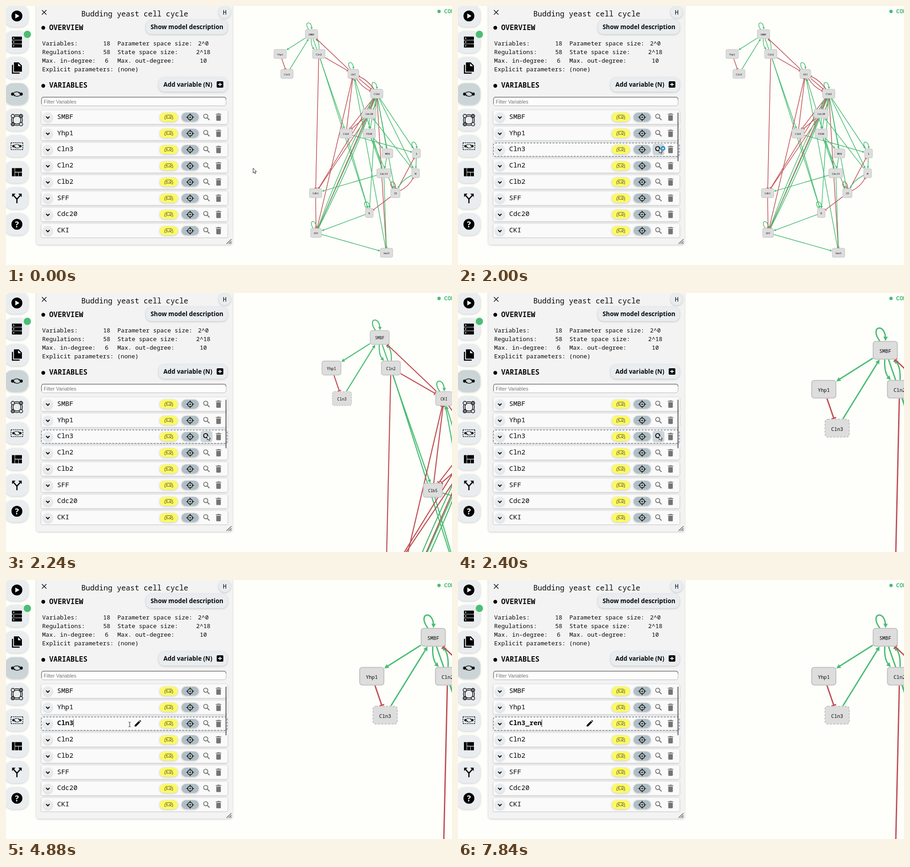
An HTML page for the animation above (8 s loop, 981 px wide and 571 px high).

```html
<!DOCTYPE html>
<html lang="en">
<head>
<meta charset="utf-8">
<title>Model editor</title>
<style>
  html, body { margin: 0; width: 100%; height: 100%; overflow: hidden; background: #fefefb; }
  svg { display: block; width: 981px; height: 571px; }
  text { white-space: pre; fill: #080808; }
  .mono { font-family: "Noto Sans Mono", "DejaVu Sans Mono", monospace; }
  .btn { font: 700 13.4px "Noto Sans", "Open Sans", sans-serif; }
  .mid { text-anchor: middle; }
  .sh { filter: drop-shadow(0 1.5px 2px rgba(0, 0, 0, .22)); }
  .line { fill: none; stroke: #111; stroke-width: 1.5; }
</style>
</head>
<body>
<svg id="stage" viewBox="0 0 981 571" xmlns="http://www.w3.org/2000/svg"></svg>
<script>
const LOOP = 8000;
const GREEN = '#4abd73', RED = '#bf5055';
const ROWS = ['SMBF', 'Yhp1', 'Cln3', 'Cln2', 'Clb2', 'SFF', 'Cdc20', 'CKI'];
const ACTIVE = 2;

// name, x, layer
const NODES = `SMBF 672 0,Yhp1 603 1,Cln2 688 1,Cln3 618 2,CKI 764 2,Clb2 815.5 3,Cdc20 799 4,
  Clb5 748 5,FEAR 799 5,MEN 839 6,S 903 6,Cdc14 831 7,M 901 7,CD 856.5 8,Cdh1 681 8,B 799 9,
  SFF 682 10,Swi5 837 11`;
// > activates, | inhibits, optional bend after the colon
const EDGES = `SMBF>SMBF CKI>CKI Clb2>Clb2 S>S B>B SFF>SFF CD|CD
  SMBF>Yhp1 Yhp1|Cln3 Cln3>SMBF SMBF>Cln2:10 Cln2>SMBF:10 CKI|SMBF SMBF>Clb5
  Cln2|CKI Cln2|Cdh1 Cln2>B Clb5>B Clb5>S Clb5|CKI SFF|CKI
  CKI|Clb2:10 Clb2|CKI:10 CKI|Clb2 Swi5>CKI Cdc14>CKI
  Clb2|Cdh1 Cdc20|Cdh1 Cdc20|Clb5 Clb2|Clb5 Cdc20|Clb2:8 Clb2>Cdc20:8
  Clb2>SFF:10 SFF>Clb2:10 Clb2|SFF SFF>Cdc20 Clb2>FEAR Clb2>MEN Clb2>S Clb2>M Clb2>CD
  Clb2|Swi5 Clb2>B Cdc20>FEAR FEAR>MEN FEAR>Cdc14 FEAR>CD MEN>Cdc14 M>Cdc20 S>M
  Cdc14>Cdh1 Cdc14>Swi5 CD|S CD|M:10 M>CD:10 CD|B B>SFF SFF>Swi5 Cdh1|SFF`;

const rect = (x, y, w, h, r, fill, more = '') =>
  `<rect x="${x}" y="${y}" width="${w}" height="${h}" rx="${r}" fill="${fill}" ${more}/>`;
const circle = (x, y, r, fill, more = '') =>
  `<circle cx="${x}" cy="${y}" r="${r}" fill="${fill}" ${more}/>`;
const path = (d, more = 'class="line"') => `<path d="${d}" ${more}/>`;
const group = (x, y, body, more = '') => `<g transform="translate(${x} ${y})" ${more}>${body}</g>`;
const mono = (x, y, size, str, more = '') =>
  `<text class="mono" x="${x}" y="${y}" font-size="${size}" ${more}>${str}</text>`;
const midMono = (x, y, size, str) =>
  `<text class="mono mid" x="${x}" y="${y}" font-size="${size}">${str}</text>`;

/* ---------- graph ---------- */

const nodes = {};
for (const item of NODES.split(',')) {
  const [name, x, layer] = item.trim().split(' ');
  nodes[name] = { name, x: +x, y: 62 + 43.82 * layer, w: 13.6 + 3.4 * name.length, h: 20 };
}

// Point where the line from p to the middle of node n meets its border
function border(n, p) {
  const dx = p.x - n.x, dy = p.y - n.y;
  const k = Math.min((n.w / 2 + .4) / Math.abs(dx || 1e-6), (n.h / 2 + .4) / Math.abs(dy || 1e-6));
  return { x: n.x + dx * k, y: n.y + dy * k };
}

function tip(p, angle, kind, color) {
  const d = kind === '>' ? 'M0 0L-4.8 -2.5V2.5Z' : 'M0 -2.8H-1.5V2.8H0Z';
  return `<path d="${d}" fill="${color}" transform="translate(${p.x} ${p.y}) rotate(${angle})"/>`;
}

function edge(spec) {
  const [, from, kind, to, bend] = spec.match(/(\w+)([>|])(\w+):?(\d*)/);
  const a = nodes[from], b = nodes[to], color = kind === '>' ? GREEN : RED;
  const stroke = `fill="none" stroke="${color}" stroke-width="1.5"`;
  if (a === b) {
    const d = `M${a.x - 6} ${a.y - 10}C${a.x - 19} ${a.y - 28} ${a.x + 1} ${a.y - 31} ${a.x + .2} ${a.y - 12}`;
    return path(d, stroke) + tip({ x: a.x + .2, y: a.y - 10.4 }, 92, kind, color);
  }
  const dx = b.x - a.x, dy = b.y - a.y, len = Math.hypot(dx, dy), off = +bend || 0;
  const c = { x: (a.x + b.x) / 2 - dy / len * off, y: (a.y + b.y) / 2 + dx / len * off };
  const p = border(a, c), q = border(b, c);
  const angle = Math.atan2(b.y - c.y, b.x - c.x), back = kind === '>' ? 3 : 1;
  const end = `${q.x - back * Math.cos(angle)} ${q.y - back * Math.sin(angle)}`;
  return path(`M${p.x} ${p.y}Q${c.x} ${c.y} ${end}`, stroke) + tip(q, angle * 180 / Math.PI, kind, color);
}

const box = n =>
  rect(n.x - n.w / 2, n.y - n.h / 2, n.w, n.h, 3, '#dddddd', `id="node-${n.name}" stroke="#bdbdbd" stroke-width=".9"`) +
  midMono(n.x, n.y + 2.9, 5.6, n.name);

const graph = `<g id="graph">${EDGES.trim().split(/\s+/).map(edge).join('')}` +
  `${Object.values(nodes).map(box).join('')}</g>`;

/* ---------- side bar ---------- */

const corners = [[-9, -9], [9, -9], [9, 9], [-9, 9]].map(([x, y], i) =>
  circle(x, y, 3.8, i % 2 ? '#777' : '#ddd', 'stroke="#111" stroke-width="1.4"')).join('');
const pair = circle(-9.5, 0, 3.4, '#111') + circle(9.5, 0, 3.4, '#111') +
  path('M-7 -3Q0 -7 6 -3M7 3Q0 7 -6 3') + path('M7 -1L6 -5L3 -2ZM-7 1L-6 5L-3 2Z', 'fill="#111"');

const ICONS = [
  circle(0, 0, 12, '#000') + path('M-3.5 -5.5V5.5L5.5 0Z', 'fill="#fff"'),
  [-12, -3.7, 4.6].map(y => rect(-11, y, 22, 7.4, 1, '#000') + circle(-7, y + 3.7, 1.3, '#fff')).join(''),
  path('M-11 -7H-8.5V10H6V12.5H-11Z', 'fill="#000"') +
    path('M-6.5 -12.5H4L11 -5.5V8H-6.5ZM2.5 -10.5V-4H9Z', 'fill="#000" fill-rule="evenodd"'),
  pair,
  path('M-7 -10Q0 -14 7 -10M10 -7Q14 0 10 7M7 10Q0 14 -7 10M-10 7Q-14 0 -10 -7' +
    'M-6 -7Q0 -10 6 -7M7 -6Q10 0 7 6M6 7Q0 10 -6 7M-7 6Q-10 0 -7 -6') + corners,
  path('M-13 -7.5H13M-13 7.5H13M-13 -7.5V7.5M13 -7.5V7.5', 'fill="none" stroke="#111" stroke-width="1.4" stroke-dasharray="3 1.6"') +
    `<g transform="scale(.8)">${pair}</g>`,
  rect(-11, -9, 6, 18, 0, '#000') + rect(-4, -9, 15, 8.3, 0, '#000') + rect(-4, .7, 7, 8.3, 0, '#000') + rect(4, .7, 7, 8.3, 0, '#000'),
  path('M0 11V2L-8 -7M0 2L8 -7', 'fill="none" stroke="#000" stroke-width="2.6"') +
    path('M-10.5 -10H-3L-10.5 -2.5ZM10.5 -10H3L10.5 -2.5Z', 'fill="#000"'),
  circle(0, 0, 12, '#000') + '<text class="btn mid" y="6.3" style="font-size:18px;fill:#fff">?</text>'
];
const bar = ICONS.map((icon, i) => group(24, 22 + 57.4 * i,
  rect(-27, -24, 52, 48, 18, i === 3 ? '#cbd5d8' : '#e9edf0', 'class="sh"') + icon)).join('') +
  circle(47, 62.5, 8, GREEN);

/* ---------- panel ---------- */

const lens = color => circle(-1.2, -1.5, 4.6, 'none', `stroke="${color}" stroke-width="1.8"`) +
  path('M2.4 2.2L7.2 7', `stroke="${color}" stroke-width="2.2"`);
const pad = path('M-5.5 -4.5H5.5Q8.5 -4.5 9 3.5Q8.5 6.5 5 2.5H-5Q-8.5 6.5 -9 3.5Q-8.5 -4.5 -5.5 -4.5ZM-4.5 -2.8V1.2M-6.5 -.8H-2.5', 'fill="none" stroke="#55552a"') +
  [[4, -2.4], [6, -.6], [2, -.6], [4, 1.2]].map(([x, y]) => circle(x, y, .9, '#55552a')).join('');
const aim = circle(0, 0, 5.5, 'none', 'stroke="#111" stroke-width="1.5"') + circle(0, 0, 1.5, '#111') +
  path('M0 -8.5V-4M0 4V8.5M-8.5 0H-4M4 0H8.5');
const bin = path('M-6 -5.6V-7.4H-3L-2 -8.4H2L3 -7.4H6V-5.6ZM-5 -4.4H5V6.2Q5 7.8 3.4 7.8H-3.4Q-5 7.8 -5 6.2Z', 'fill="#747474"');

const row = (name, i) => group(0, 245 + 35.75 * i,
  rect(78, -15, 409, 30, 4, '#fafafa', 'class="sh"') +
  (i === ACTIVE
    ? rect(78, -14.5, 408.5, 29.5, 4, 'none', 'id="dash" stroke="#72828f" stroke-width="1.4" stroke-dasharray="4 3"')
    : '') +
  circle(92, .5, 10, '#e7ebee', 'class="sh"') + path('M88.2 -1.2L92 2.6L95.8 -1.2', 'fill="none" stroke="#111" stroke-width="2.2"') +
  mono(112.5, 3.8, 14.9, name, i === ACTIVE ? 'id="label"' : '') +
  rect(338, -10, 40, 20, 10, '#fcf964', 'class="sh"') + group(358, 0, pad) +
  rect(386, -10, 38, 20, 10, '#b0bec5', 'class="sh"') + group(405, .3, aim) +
  (i === ACTIVE
    ? `<g id="hot">${rect(428, -12.5, 26, 25, 5, '#cbd5da')}${group(440.5, -.5, lens('#000'))}</g>` +
      group(440.5, -.5, lens('#777'), 'id="cold"')
    : group(440.5, -.5, lens('#777'))) +
  group(467.5, .2, bin));

const stat = (y, a, av, b, bv) => mono(79.5, y, 13.1, a) + midMono(221.5, y, 13.1, av) +
  mono(245, y, 13.1, b) + midMono(434, y, 13.1, bv);

const panel =
  rect(67, -6, 431, 532, 5, '#f3f3f3', 'class="sh"') +
  path('M79 9L89 19M89 9L79 19') +
  mono(165.5, 22.5, 16.35, 'Budding yeast cell cycle') +
  circle(481, 14, 13, '#e9edf0', 'class="sh"') + midMono(481, 18.5, 13.5, 'H') +
  circle(82, 48, 4.2, '#000') + mono(95, 53, 15.6, 'OVERVIEW', 'font-weight="600"') +
  rect(308, 31, 179, 31, 12, '#e9edf0', 'class="sh"') + '<text class="btn mid" x="398" y="50.6">Show model description</text>' +
  stat(86.9, 'Variables:', 18, 'Parameter space size:', '2^0') +
  stat(105.9, 'Regulations:', 58, 'State space size:', '2^18') +
  stat(124.9, 'Max. in-degree:', 6, 'Max. out-degree:', 10) +
  mono(79.5, 143.9, 13.1, 'Explicit parameters: (none)') +
  circle(82, 176, 4.2, '#000') + mono(95, 180.2, 15.6, 'VARIABLES', 'font-weight="600"') +
  rect(336, 158, 151, 31, 12, '#e9edf0', 'class="sh"') + '<text class="btn mid" x="400" y="178">Add variable (N)</text>' +
  rect(463.5, 166, 14.5, 14, 2, '#000') + path('M470.7 169V177M466.7 173H474.7', 'stroke="#fff" stroke-width="1.8"') +
  rect(78, 201, 406, 19, 5, '#fdfdfd', 'stroke="#b5b5b5"') + path('M78.3 216V206Q78.3 201 83 201H479Q484 201 484 206', 'fill="none" stroke="#7c7c7c" stroke-width="1.3"') +
  '<text x="83" y="215" font-family="Liberation Sans, Arial, sans-serif" font-size="10.9" style="fill:#757575">Filter Variables</text>' +
  `<clipPath id="list">${rect(70, 225, 425, 287, 0, '#000')}</clipPath>` +
  `<g clip-path="url(#list)">${ROWS.map(row).join('')}</g>` +
  rect(482.8, 235, 2.2, 107.5, 1, '#6b6b6b', 'id="scroll"') +
  path('M485 524.5L496 514M489.5 524.5L496 518.5M493.5 524.5L496 522', 'stroke="#555" stroke-width="1.2"') +
  path('M149 308V324', 'id="caret" stroke="#111"') +
  group(290, 316, path('M-7 7V4L2.2 -5.2L5.2 -2.2L-4 7ZM3.2 -6.2L4.6 -7.4L7.4 -4.6L6.2 -3.2Z', 'fill="#000"'), 'id="pencil"');

const status = circle(952.5, 12, 3.7, GREEN) +
  mono(963.5, 16, 13, 'CONNECTED', `font-weight="700" style="fill:${GREEN}"`);

const pointers =
  path('M0 0V10.6L2.5 8.4L4.2 12.2L5.9 11.4L4.3 7.7H7.6Z', 'id="arrow" fill="#fff" stroke="#111" stroke-width=".9"') +
  circle(451, 314, 3.8, '#a9dcf2', 'id="busy" stroke="#1c86bf" stroke-width="2.4"') +
  path('M-2.5 -5H-.6L0 -4.4L.6 -5H2.5M0 -4.4V4.4M-2.5 5H-.6L0 4.4L.6 5H2.5', 'id="beam" fill="none" stroke="#222" stroke-width="1"');

document.getElementById('stage').innerHTML = graph + status + bar + panel + pointers;

/* ---------- motion ---------- */

const $ = id => document.getElementById(id);
const show = (id, on) => $(id).setAttribute('visibility', on ? 'visible' : 'hidden');
const mix = (a, b, k) => a + (b - a) * k;

const PATH = [[0, 543.5, 357.5], [240, 543.5, 357.5], [960, 487.5, 323.5], [1500, 442.5, 313.5],
  [4000, 442.5, 313.5], [4320, 272, 318.5], [LOOP, 272, 318.5]];
const TYPED = [[7200, '_'], [7440, 'r'], [7680, 'e'], [7840, 'n']];
const FOCUS = 4400, BLINK = 530;
const ZOOM = { start: 2073, time: 300, scale: 1.96, x: -377.3, y: 4.7 };

function pointerAt(t) {
  const i = PATH.findIndex(p => p[0] > t);
  const [t0, x0, y0] = PATH[i - 1], [t1, x1, y1] = PATH[i];
  const k = (t - t0) / (t1 - t0);
  return [mix(x0, x1, k), mix(y0, y1, k)];
}

function draw(t) {
  const [x, y] = pointerAt(t);
  const over = x < 486, edit = t >= FOCUS, typing = t >= TYPED[0][0];
  const onText = x < 300, onLens = x > 428 && x < 455;

  const k = Math.min(1, Math.max(0, (t - ZOOM.start) / ZOOM.time));
  $('graph').setAttribute('transform',
    `translate(${ZOOM.x * k} ${ZOOM.y * k}) scale(${mix(1, ZOOM.scale, k)})`);
  $('node-Cln3').setAttribute('stroke-dasharray', over ? '2.4 1.4' : 'none');

  show('dash', over);
  show('scroll', over);
  show('hot', onLens);
  show('cold', !onLens);
  show('pencil', edit);

  const label = $('label');
  label.textContent = ROWS[ACTIVE] + TYPED.filter(key => t >= key[0]).map(key => key[1]).join('');
  label.setAttribute('font-weight', edit ? 700 : 400);
  show('caret', edit && (typing || Math.floor((t - FOCUS) / BLINK) % 2 === 0));
  if (edit) {
    const end = 112.5 + label.getComputedTextLength() + .3;
    $('caret').setAttribute('d', `M${end} 307.5V324`);
  }

  for (const id of ['arrow', 'beam']) $(id).setAttribute('transform', `translate(${x} ${y})`);
  show('arrow', !onText);
  show('beam', onText && !typing);
  show('busy', t >= 1920 && t < 2080);
}

const begin = performance.now();
function tick() {
  draw((performance.now() - begin) % LOOP);
  requestAnimationFrame(tick);
}
tick();
</script>
</body>
</html>
```
